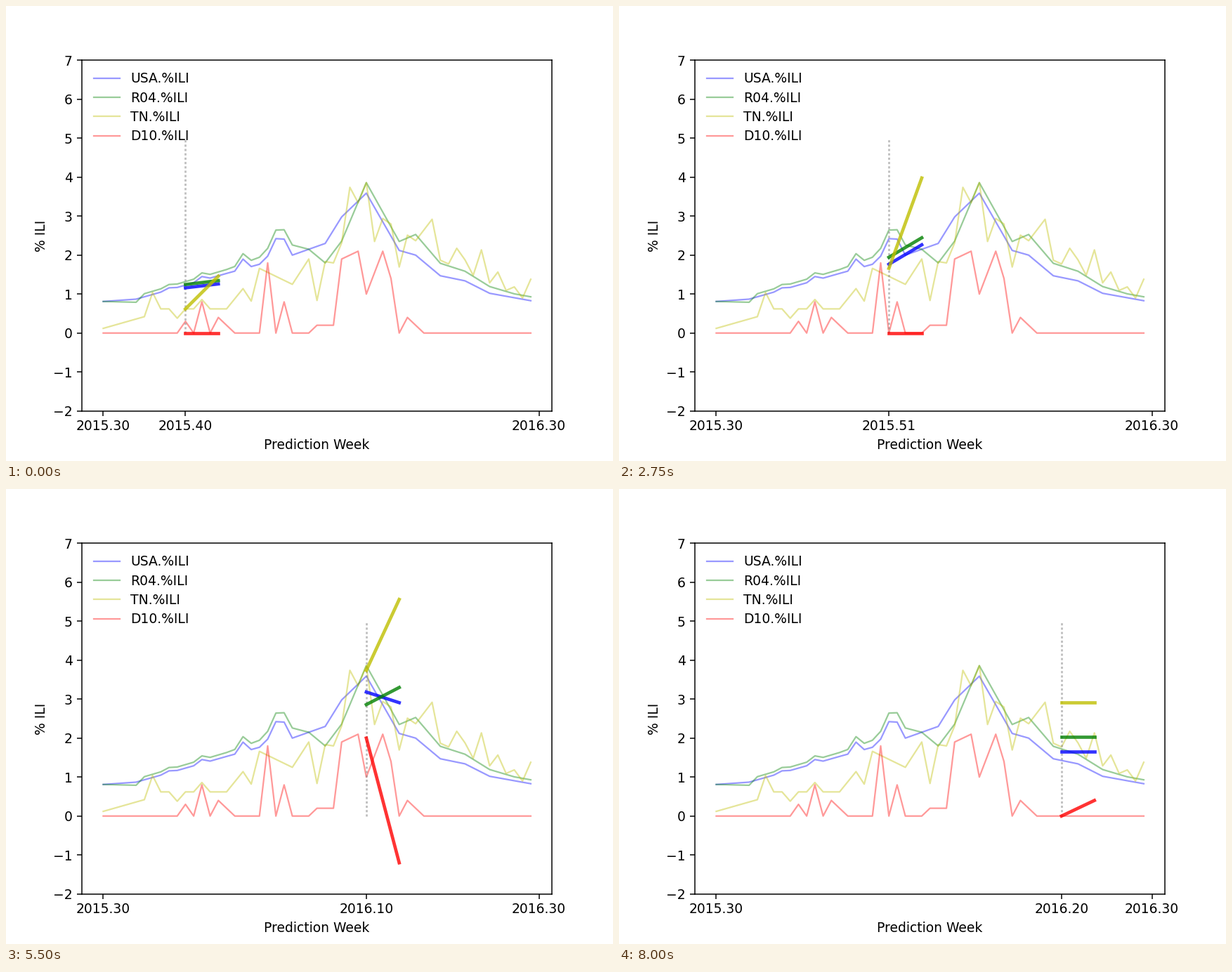
Animation, 864 px wide and 648 px high, one loop 8250 ms. Source, as a matplotlib script:

```python
import matplotlib.pyplot as plt
import numpy as np
from matplotlib.animation import FuncAnimation

WEEKS = 53
FRAMES = 33
FIRST = 10      # week index of the first forecast
LAG = 2         # the newest known value is this many weeks old
HORIZON = 4
weeks = np.arange(WEEKS)


def trend(*points):
    """Straight runs between (week, value) corners."""
    return np.interp(weeks, *zip(*points))


def blips(**heights):
    """Offsets for single weeks, given as w12=0.1."""
    out = np.zeros(WEEKS)
    for key, height in heights.items():
        out[int(key[1:])] = height
    return out


# Slow rise, sharp winter peak, decline; the holiday blips are shared
nation = trend((0, 0.81), (4, 0.87), (15, 1.53), (23, 2.0), (27, 2.3),
               (29, 2.98), (32, 3.59), (36, 2.12), (38, 2.0), (41, 1.47),
               (44, 1.34), (47, 1.02), (52, 0.83))
nation += blips(w8=0.05, w12=0.1, w17=0.25, w20=0.15, w21=0.54, w22=0.47)

# The region follows the nation with a drifting offset
region = nation + trend((0, 0), (4, -0.08), (5, 0.08), (15, 0.1), (23, 0.26),
                        (25, 0), (27, -0.5), (29, -0.62), (32, 0.27),
                        (36, 0.23), (38, 0.53), (41, 0.32), (50, 0.1))

state = trend((0, 0.12), (5, 0.42), (7, 0.62), (15, 0.62), (19, 1.66),
              (23, 1.25), (25, 1.9), (28, 1.8), (32, 3.86), (34, 2.94),
              (38, 2.37), (40, 2.92), (41, 1.87), (51, 0.9), (52, 1.38))
state += blips(w6=0.52, w9=-0.24, w12=0.24, w18=-0.58, w26=-1.03, w30=0.91,
               w33=-1.05, w36=-0.96, w43=0.5, w44=0.3)
state[46:51:2] += 0.75 * 0.5 ** np.arange(3)

district = trend((25, 0), (26, 0.2), (28, 0.2), (29, 1.9), (31, 2.1),
                 (32, 1.0), (34, 2.1), (35, 1.4), (36, 0))
district += blips(w10=0.3, w12=0.8, w14=0.4, w15=0.2, w20=1.8, w22=0.8,
                  w37=0.4, w38=0.2)

SERIES = [("USA.%ILI", "b", nation), ("R04.%ILI", "g", region),
          ("TN.%ILI", "y", state), ("D10.%ILI", "r", district)]


def week_name(i):
    week = 30 + i
    return f"2015.{week:02d}" if week <= 52 else f"2016.{week - 52:02d}"


def forecast(values, week):
    """Start and end of the line extrapolated from the last three values."""
    a, b, c = values[week - LAG - 2:week - LAG + 1]
    slope = ((c - b) - (b - a)) / 2
    return [c, c + HORIZON * slope]


fig, ax = plt.subplots(figsize=(6.4, 4.8), dpi=135)
fig.subplots_adjust(right=0.8997, top=0.8806)
for name, color, values in SERIES:
    ax.plot(weeks, values, color=color, alpha=0.4, lw=1.2, label=name)

marker, = ax.plot([], [], color="gray", alpha=0.5, lw=1.5, ls=(0, (1.1, 1.1)))
lines = [ax.plot([], [], color=color, alpha=0.8, lw=2.5)[0]
         for _, color, _ in SERIES]

margin = 0.05 * (WEEKS - 1)
ax.set_xlim(-margin, WEEKS - 1 + margin)
ax.set_ylim(-2, 7)
ax.tick_params(axis="x", pad=3.1)
ax.set_xlabel("Prediction Week")
ax.set_ylabel("% ILI")
ax.legend(loc="upper left", frameon=False, labelspacing=0.447)


def update(frame):
    week = FIRST + frame
    marker.set_data([week, week], [0, 5])
    for line, (_, _, values) in zip(lines, SERIES):
        line.set_data([week, week + HORIZON], forecast(values, week))
    ax.set_xticks([0, week, WEEKS], [week_name(i) for i in (0, week, WEEKS - 1)])
    return [marker, *lines]


anim = FuncAnimation(fig, update, frames=FRAMES, interval=250,
                     repeat=True, repeat_delay=0, blit=False)
plt.show()
```
